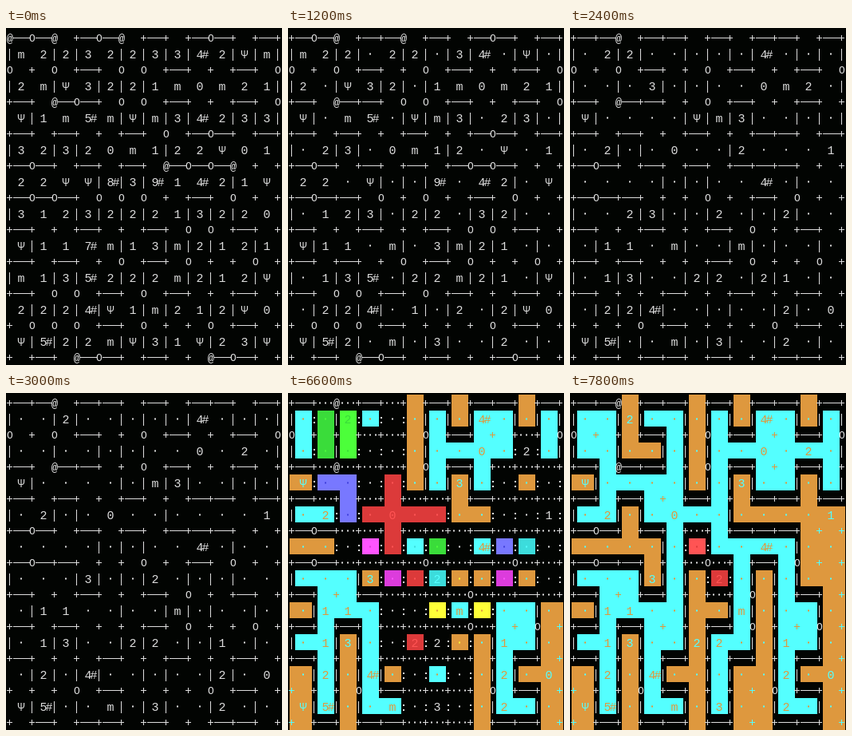
These frames come from a looping animation (346x422 px, 8 s). An HTML page with a canvas:

```html
<!DOCTYPE html>
<html>
<head>
<meta charset="utf-8">
<style>
html, body { margin: 0; height: 100%; overflow: hidden; background: #020402; }
canvas { display: block; }
</style>
</head>
<body>
<canvas id="stage" width="346" height="422"></canvas>
<script>
const ctx = document.getElementById('stage').getContext('2d');
const LOOP = 8000;
const STARTS = [0, 1200, 1800, 2400, 3000, 4800, 6600, 7800];
const ROWS = 10, COLS = 12;
const INK = '#dddddd';
const FAMILY = '"Liberation Mono", "DejaVu Sans Mono", monospace';

// Each token is a symbol followed by the step after which it disappears (5 = stays).
const parse = lines => lines.map(line => line.split(' ').map(t =>
  ({ sym: t.slice(0, -1) || t, last: +t.slice(-1) })));

const clues = parse([
  'm2 23 25 30 22 21 30 31 4#5 20 Ψ1 m0',
  '21 m0 Ψ2 33 22 20 11 m2 05 m3 25 12',
  'Ψ5 10 m2 5#1 m0 Ψ3 m4 35 4#0 22 31 30',
  '30 25 31 20 05 m1 12 23 20 Ψ1 00 15',
  '21 22 Ψ0 Ψ1 8#0 30 9#1 10 4#5 21 10 Ψ2',
  '30 11 23 35 20 21 25 10 31 23 20 00',
  'Ψ2 15 15 7#0 m3 10 31 m5 22 11 20 10',
  'm0 15 35 5#1 20 25 25 m1 23 15 20 Ψ2',
  '20 25 23 4#5 Ψ0 11 m0 21 10 25 Ψ2 05',
  'Ψ5 5#5 22 20 m5 Ψ0 35 10 Ψ0 25 30 Ψ0'
]);

const corners = parse([
  '@0 O2 @5 + O0 @1 + + + O2 + + +',
  'O5 + O4 + + O0 O5 + + + + + O5',
  '+ + @5 O0 + O2 O5 + + + + + O1',
  '+ + + + + + + O0 + O2 + + +',
  '+ O5 + + + + + @0 O2 O1 @0 + +',
  '+ O5 O0 + O1 O0 O5 + + + O5 + +',
  '+ + + + + + + + O5 O2 + + +',
  '+ + + + + O2 + + O5 + + O5 +',
  '+ + O2 O2 + + O2 + + + + + +',
  '+ O2 O1 O5 + + O0 + + O5 + + +',
  '+ + + @2 O2 + + + + @0 O2 + +'
]);

// C is inside the loop, O outside; other letters are undecided groups.
const solved = [
  'CCOCCOCOCCOC', 'CCOOCOCCCCCC', 'OCCCCOCOCCOC', 'CCOCCCCOOOOO', 'OOOOCOCCCCOO',
  'CCCOCOCCOCOO', 'OCCCCOOCOCCO', 'CCOCCOCCOCCO', 'OCOCOOCOOCOO', 'OCOCCOCOOCCO'
];
const blank = solved.map(() => '.'.repeat(COLS));
const partial = [
  'CgGC.OCOCCOC', 'CgG..OCCCC.C', 'Obb.rOCOC.O.', 'CCbrrrrOO...', 'OO.MrTg.Cbt.',
  'CCCOmrtoOmO.', 'OCCC..yCyCCO', 'CCOC.r.oOCCO', 'OCOCO.C.OCOO', 'OCOCC...OCCO'
];
const nearlyDone = [...solved];
nearlyDone[4] = 'OOOOCRCCCCOO';
nearlyDone[5] = 'CCCOCOrCOCOO';

const COLORS = {
  C: '#54ffff', O: '#de983e', T: '#54ffff', t: '#3cdcdc', o: '#de983e', y: '#ffff38',
  g: '#3adc3a', G: '#4cff3a', r: '#dc3a3a', R: '#ff5454', b: '#7878ff', B: '#4040dc',
  m: '#dc3cdc', M: '#ff54ff'
};
const OPPOSITE = {};
for (const [a, b] of ['CO', 'tT', 'oy', 'gG', 'rR', 'bB', 'mM']) {
  OPPOSITE[a] = b;
  OPPOSITE[b] = a;
}

function rect(x, y, w, h, color) {
  ctx.fillStyle = color;
  ctx.fillRect(x, y, w, h);
}

// x, y is the top left of a 7 by 20 character box.
function glyph(ch, x, y, color) {
  if (ch === '·') rect(x + 2, y + 9.5, 2, 2, color);
  else if (ch === ':') {
    rect(x + 2, y + 8, 2, 2, color);
    rect(x + 2, y + 14, 2, 2, color);
  } else if (ch === '|') rect(x + 2, y + 4, 1, 15, color);
  else if (ch === '─') rect(x, y + 10, 7, 1, color);
  else if (ch === '+') {
    rect(x - 1, y + 10, 7, 1, color);
    rect(x + 2, y + 7, 1, 7, color);
  } else {
    const style = { O: '13px', '@': 'bold 14px' }[ch] || '15px';
    ctx.font = `${style} ${FAMILY}`;
    ctx.fillStyle = color;
    ctx.fillText(ch, x + 3, y + (ch === 'O' ? 15 : 16));
  }
}

function write(text, x, y, color) {
  [...text].forEach((ch, i) => glyph(ch, x + 7 * i, y, color));
}

function draw(step) {
  const grid = step < 5 ? solved : [blank, partial, nearlyDone][step - 5];
  const painted = step > 5;
  const at = (r, c) => grid[r]?.[c] ?? 'O';
  const fill = (group, x, y, w) => {
    if (painted && group !== '.') rect(x, y, w, 20, COLORS[group]);
  };
  const inkOn = group => painted && group !== '.' ? COLORS[OPPOSITE[group]] : INK;
  const shownSym = (item, empty) => item.last >= Math.min(step, 5) ? item.sym : empty;

  function edge(a, b, x, y, w, wall, open) {
    if (a === b && a !== '.') fill(a, x, y, w);
    else write(OPPOSITE[a] === b ? wall : open, x, y, INK);
  }

  rect(0, 0, 346, 422, '#020402');
  ctx.textAlign = 'center';

  for (let r = 0; r <= ROWS; r++) {
    for (let c = 0; c <= COLS; c++) {
      const x = 2 + 28 * c, y = 2 + 40 * r;
      const here = at(r, c);
      if (c < COLS) edge(at(r - 1, c), here, x + 7, y, 21, '───', '···');
      if (r < ROWS) edge(at(r, c - 1), here, x, y + 20, 7, '|', ':');

      const joined = [at(r - 1, c - 1), at(r - 1, c), at(r, c - 1)].every(g => g === here);
      if (joined) fill(here, x, y, 7);
      glyph(shownSym(corners[r][c], '+'), x, y, joined ? inkOn(here) : INK);

      if (r < ROWS && c < COLS) {
        fill(here, x + 7, y + 20, 21);
        write(shownSym(clues[r][c], '·'), x + 14, y + 20, inkOn(here));
      }
    }
  }
}

let shown = -1;
function tick() {
  const t = performance.now() % LOOP;
  const step = STARTS.filter(s => s <= t).length - 1;
  if (step !== shown) draw(shown = step);
  requestAnimationFrame(tick);
}
tick();
</script>
</body>
</html>
```
